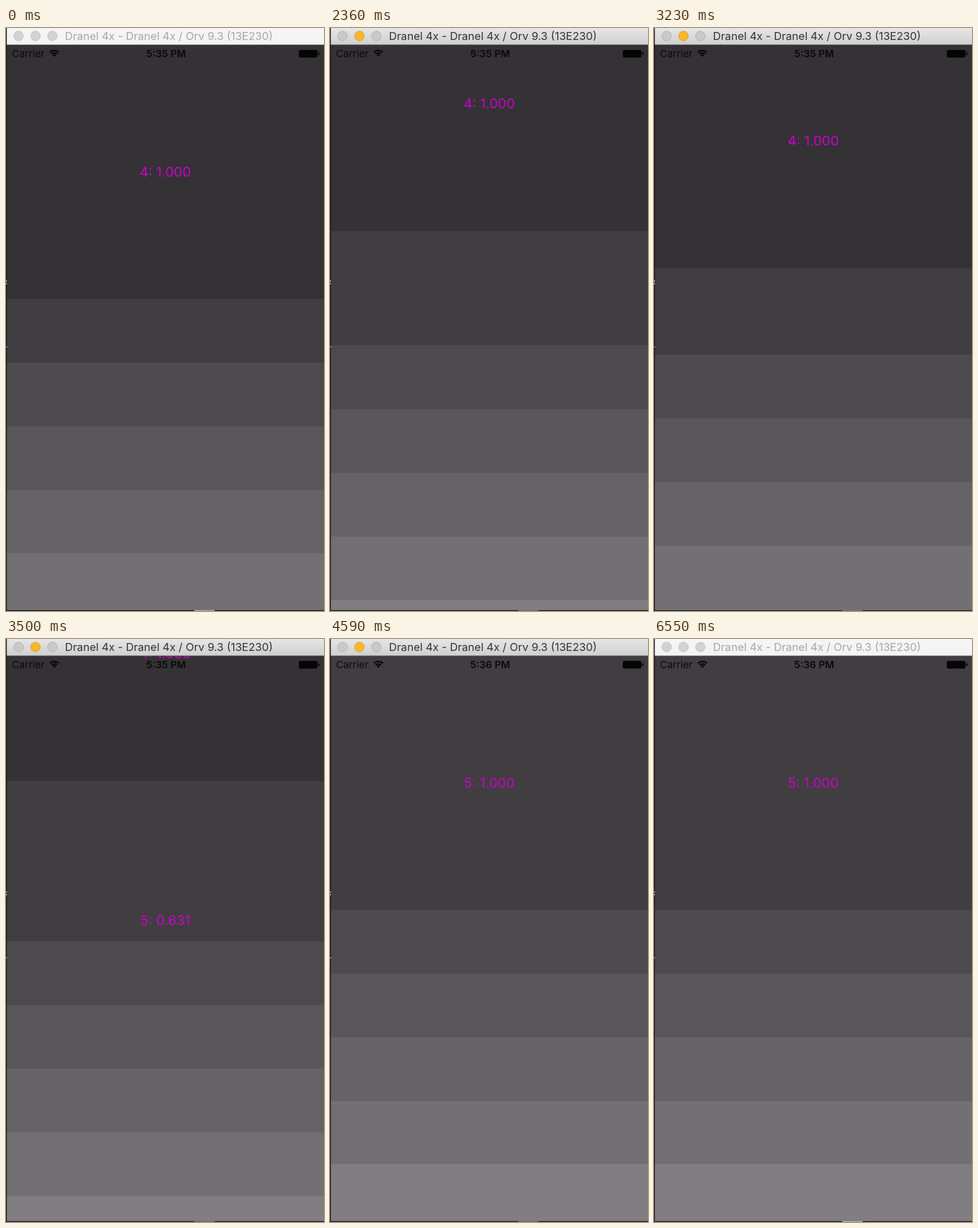
Animation of 480 by 878 pixels, one loop 7400 ms. Source, as an HTML page with a canvas:

```html
<!DOCTYPE html>
<html lang="en">
<head>
<meta charset="utf-8">
<title>Expanding cells</title>
<style>
  html, body { margin: 0; width: 100%; height: 100%; overflow: hidden; background: #111; }
  canvas { display: block; }
</style>
</head>
<body>
<canvas id="stage" width="480" height="878"></canvas>
<script>
const ctx = document.getElementById('stage').getContext('2d');
const LOOP = 7400;
const WIDTH = 480, HEIGHT = 878;
const TOP = 25.2, FULL = 383, SMALL = 95.8;
const FIRST_CELL = 4;
const SHADES = [52, 64, 76, 88, 101, 114, 128];
const TITLE = 'Dranel 4x - Dranel 4x / Orv 9.3 (13E230)';

// Scroll position in cells: a drag that snaps back, then a drag that snaps on.
function scrollAt(t) {
  if (t < 2050 || t >= 4320) return t < 2050 ? 0 : 1;
  if (t < 2340) {
    const u = (t - 2050) / 290;
    return 0.315 * u * u * (3 - 2 * u);
  }
  const snapBack = 0.315 * Math.exp((2340 - t) / 130);
  if (t < 2900) return snapBack;
  if (t < 3590) return snapBack + 0.5058 * ((t - 2900) / 600) ** 2.4;
  return 1 - 0.293 * Math.exp((3590 - t) / 118);
}

function rect(color, x, y, w, h) {
  ctx.fillStyle = color;
  ctx.fillRect(x, y, w, h);
}

function text(value, x, y, color, font, align = 'left') {
  ctx.fillStyle = color;
  ctx.font = `${font} Inter, sans-serif`;
  ctx.textAlign = align;
  ctx.fillText(value, x, y);
}

function drawCells(scroll) {
  let top = TOP - scroll * FULL;
  SHADES.forEach((shade, i) => {
    const growth = i === 0 ? 1 : i === 1 ? scroll : 0;
    const height = SMALL + (FULL - SMALL) * growth;
    const ratio = height / FULL;
    const edge = Math.round(top);
    rect(`rgb(${shade},${shade - 2},${shade})`, 1, edge, WIDTH - 1, HEIGHT - edge);
    const labelY = top + height / 2 + (FULL - height) * ratio;
    text(`${FIRST_CELL + i}: ${ratio.toFixed(3)}`, 240.5, Math.round(labelY + 7), '#cc00cc', '20.5px', 'center');
    top += height;
  });
}

function drawWifi(x, y) {
  ctx.strokeStyle = '#080808';
  ctx.lineWidth = 2.2;
  for (const radius of [5.9, 9.6]) {
    ctx.beginPath();
    ctx.arc(x, y, radius, -Math.PI * 0.75, -Math.PI * 0.25);
    ctx.stroke();
  }
  ctx.fillStyle = '#080808';
  ctx.beginPath();
  ctx.moveTo(x, y);
  ctx.arc(x, y, 3.7, -Math.PI * 0.75, -Math.PI * 0.25);
  ctx.fill();
}

function drawStatusBar(t) {
  text('Carrier', 9, 44, '#0a0a0a', '15px');
  drawWifi(73, 43.5);
  text(t < 3900 ? '5:35 PM' : '5:36 PM', 241.7, 44, '#0a0a0a', '600 15px', 'center');
  ctx.fillStyle = '#050505';
  ctx.beginPath();
  ctx.roundRect(442, 33, 28, 11.5, 2);
  ctx.roundRect(471, 36.5, 2, 4.5, 1);
  ctx.fill();
}

function drawTitleBar(active) {
  const fill = ctx.createLinearGradient(0, 0, 0, 25);
  fill.addColorStop(0, active ? '#e7e6e7' : '#f6f5f6');
  fill.addColorStop(1, active ? '#d0cfd0' : '#f4f3f4');
  rect(fill, 1, 0, WIDTH - 1, 25);
  rect(active ? '#aaa9aa' : '#d0cfd0', 1, 24.5, WIDTH - 1, 0.8);
  [19, 44.5, 70].forEach((x, i) => {
    const lit = active && i === 1;
    ctx.beginPath();
    ctx.arc(x, 12, 7.2, 0, Math.PI * 2);
    ctx.fillStyle = lit ? '#f8b62b' : active ? '#cac9ca' : '#d3d2d3';
    ctx.fill();
    ctx.strokeStyle = lit ? '#dca024' : active ? '#b4b3b4' : '#c5c4c5';
    ctx.lineWidth = 1;
    ctx.stroke();
  });
  text(TITLE, 89, 18, active ? '#353435' : '#a8a7a8', '16.5px');
}

function drawEdges(active) {
  rect('#151315', 0, 0, 1.2, HEIGHT);
  rect('#151315', 0, 876.8, WIDTH, 1.2);
  rect('#d8d8d8', 0, 380, 1.2, 2);
  rect('#d8d8d8', 0, 384, 1.2, 2);
  rect('#d8d8d8', 0, 479.5, 1.2, 1.5);
  rect(active ? '#757375' : '#b5b4b5', 284, 876.6, 31, 1.4);
}

function draw(now) {
  const t = now % LOOP;
  const active = t >= 2050 && t < 5320;
  drawCells(scrollAt(t));
  drawStatusBar(t);
  drawTitleBar(active);
  drawEdges(active);
  requestAnimationFrame(draw);
}

requestAnimationFrame(draw);
</script>
</body>
</html>
```
